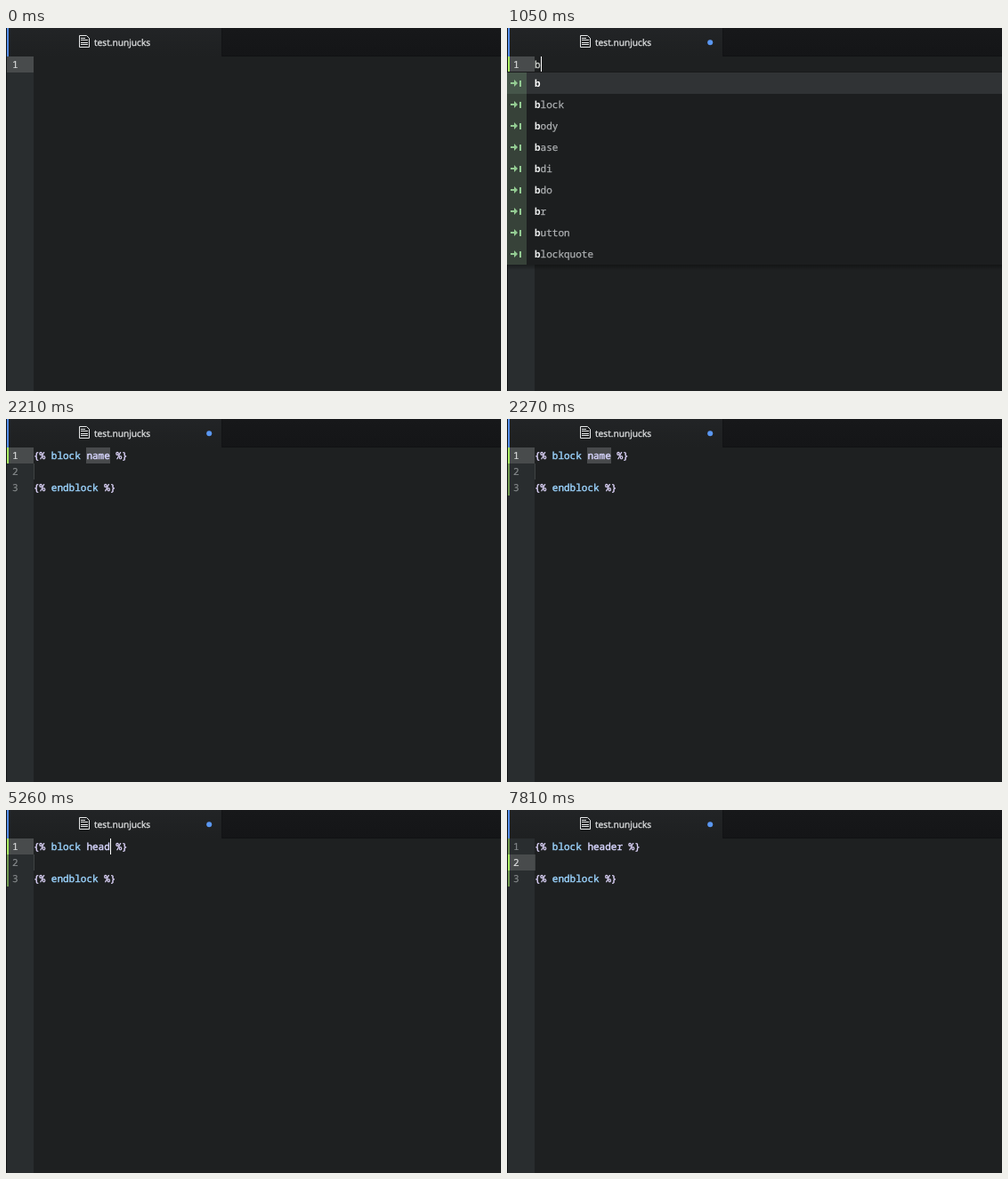
Recreate the animation shown at these times as an HTML page with a canvas. Size 556 px wide and 408 px high, loop 8 s.

```html
<!DOCTYPE html>
<html lang="en">
<head>
<meta charset="utf-8">
<style>
  html, body { margin: 0; height: 100%; overflow: hidden; background: #1e2021; }
  canvas { display: block; }
</style>
</head>
<body>
<canvas id="stage" width="556" height="408"></canvas>
<script>
const LOOP = 8000, W = 556, H = 408;
const LEFT = 31, TOP = 32, LINE = 18, CHAR = 6.6, ROW = 24, POPUP = 50;
const MONO = '11px "Noto Sans Mono", monospace';
const UI = '"Open Sans", sans-serif';
const WORDS = ['b', 'block', 'body', 'base', 'bdi', 'bdo', 'br', 'button', 'blockquote'];

const TYPED = 120, POPUP_OPEN = 240, MODIFIED = 490, ARROW_DOWN = 1230;
const INSERTED = 2210, DIFF_DONE = 2270, NEXT_LINE = 6550;
const KEYS = [4270, 4520, 5080, 5260, 5440, 5620];
const BLINKS = [120, 620, 1050, 1420, 1850, 2210, 4270, 5010, 5080, 6110, 6480, 7040, 7440, 7810];

const ctx = document.getElementById('stage').getContext('2d', { alpha: false });
ctx.textRendering = 'geometricPrecision';
ctx.lineJoin = 'round';

const passed = (times, t) => times.filter(time => time <= t).length;
const column = n => Math.round(LEFT + n * CHAR);
const lineTop = n => TOP + n * LINE;

function box(x, y, w, h, color) {
  ctx.fillStyle = color;
  ctx.fillRect(x, y, w, h);
}

function shade(x, y, w, h, from, to) {
  const fill = ctx.createLinearGradient(0, y, 0, y + h);
  fill.addColorStop(0, from);
  fill.addColorStop(1, to);
  box(x, y, w, h, fill);
}

// A thin outline in the text colour gives the strokes a little more weight.
function text(str, x, y, color, { font = MONO, weight = 0.2 } = {}) {
  ctx.font = font;
  ctx.fillStyle = ctx.strokeStyle = color;
  ctx.lineWidth = weight;
  ctx.fillText(str, x, y);
  ctx.strokeText(str, x, y);
}

function code(parts, line) {
  let x = LEFT;
  for (const [str, color] of parts) {
    text(str, x, lineTop(line) + 13, color, { weight: 0.4 });
    x += str.length * CHAR;
  }
}

function fileIcon() {
  ctx.strokeStyle = '#e4e6e7';
  ctx.lineWidth = 1;
  ctx.stroke(new Path2D('M82.5 8.5h8l3 3v10h-11zM84 11.5h5M84 13.5h8M84 16.5h8M84 18.5h8'));
}

function tabs(modified) {
  shade(0, 0, W, TOP, '#17181a', '#141517');
  shade(0, 0, 242, TOP, '#222426', '#1e2021');
  box(242, 0, 1, TOP, '#121315');
  box(243, 31, W - 243, 1, '#101113');
  box(0, 0, 1, H, '#121415');
  box(1, 0, 2, TOP, '#568ff0');
  fileIcon();
  text('test.nunjucks', 99, 20, '#e2e4e5', { font: '10.2px ' + UI, weight: 0.3 });
  if (modified) {
    ctx.fillStyle = '#5a97f2';
    ctx.beginPath();
    ctx.arc(228.2, 16.3, 3, 0, 7);
    ctx.fill();
  }
}

function gutter(t, active) {
  box(1, TOP, 30, H - TOP, '#292d2f');
  box(1, lineTop(active), 30, LINE, '#484b4c');
  const count = t < INSERTED ? 1 : 3;
  const marked = t < MODIFIED ? 0 : t < DIFF_DONE ? 1 : 3;
  for (let i = 0; i < count; i++) {
    if (i < marked) box(1, lineTop(i), 2, LINE, i === active ? '#a9f562' : '#6f9850');
    text(i + 1, 7, lineTop(i) + 13, i === active ? '#dadcdc' : '#85898b');
  }
}

function popup(selected) {
  const height = WORDS.length * ROW;
  const bottom = POPUP + height + (selected ? 44 : 0);
  shade(0, bottom, W, 6, 'rgba(0,0,0,.35)', 'rgba(0,0,0,0)');
  box(0, POPUP - 1, W, 1, '#18191a');
  box(0, POPUP, W, height, '#1c1e1f');
  WORDS.forEach((word, i) => {
    const y = POPUP + i * ROW, on = i === selected;
    if (on) box(22, y, W - 22, ROW, '#303335');
    box(0, y, 22, ROW, on ? '#46564a' : '#374239');
    ctx.fillStyle = '#94cc93';
    ctx.fill(new Path2D(`M4 ${y + 11}h4v-3l4 4-4 4v-3h-4zM14 ${y + 9}h2v7h-2z`));
    text('b', LEFT, y + 16, on ? '#ffffff' : '#eceeee', { font: 'bold ' + MONO, weight: 0.01 });
    text(word.slice(1), LEFT + CHAR, y + 16, on ? '#ffffff' : '#aeb1b3', { weight: on ? 0.4 : 0.25 });
  });
  if (!selected) return;
  const style = { font: '12.36px ' + UI };
  box(0, POPUP + height, W, 44, '#131516');
  text('block defines a section on the template and identifies it with a name. This is used by template inheritance.', 5, 284, '#b0b3b5', style);
  text('blocks and child templates can override them with new content.', 5, 301, '#b0b3b5', style);
  text('More..', 377, 301, '#6a9af5', style);
}

function draw(t) {
  const active = t < NEXT_LINE ? 0 : 1;
  const keys = passed(KEYS, t);
  const name = keys ? 'header'.slice(0, keys) : 'name';
  box(0, 0, W, H, '#1e2021');
  tabs(t >= MODIFIED);
  gutter(t, active);

  if (t >= INSERTED) {
    const tag = '#e2d8ff', keyword = '#9cd4ff';
    if (!keys) box(90, TOP, 27, LINE, '#484a4c');
    box(LEFT, lineTop(1), 1, LINE, '#3f4243');
    code([['{% ', tag], ['block ', keyword], [name, '#d8d6ff'], [' %}', tag]], 0);
    code([['{% ', tag], ['endblock', keyword], [' %}', tag]], 2);
  } else if (t >= TYPED) {
    code([['b', '#c9cdc8']], 0);
  }

  if (passed(BLINKS, t) % 2) {
    const col = active ? 2 : t < INSERTED ? 1 : 9 + keys;
    box(column(col), lineTop(active), 1, LINE, '#ffffff');
  }
  if (t >= POPUP_OPEN && t < INSERTED) popup(t < ARROW_DOWN ? 0 : 1);
}

function tick() {
  draw(performance.now() % LOOP);
  requestAnimationFrame(tick);
}
tick();
</script>
</body>
</html>
```
